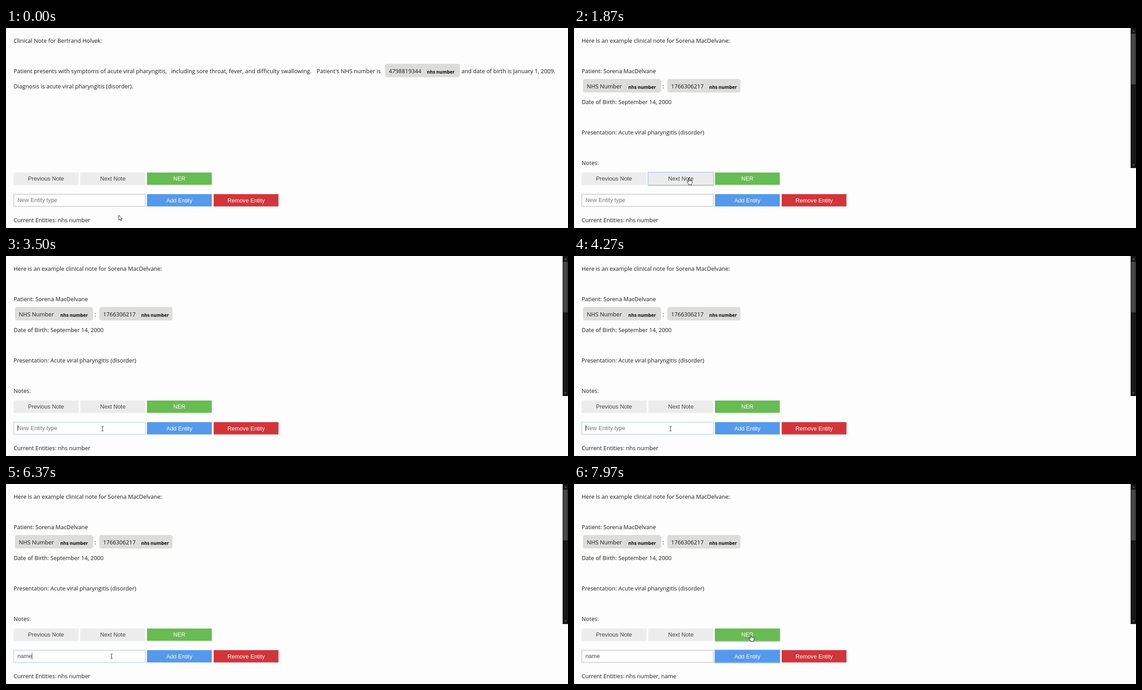
Recreate the animation shown at these times as an HTML page. Size 1253 by 447 pixels, loop 8000 ms.

```html
<!DOCTYPE html>
<html lang="en">
<head>
<meta charset="utf-8">
<title>Clinical note entities</title>
<style>
html, body { margin: 0; width: 100%; height: 100%; overflow: hidden; background: #fcfdfc; }
svg { display: block; width: 1253px; height: 447px; }
text { font: 12.7px "Open Sans", "Noto Sans", sans-serif; fill: #1c1c1c; white-space: pre; }
.tag { font-weight: 700; font-size: 10.2px; fill: #080808; }
.ui { font: 12.8px "Liberation Sans", Arial, sans-serif; fill: #444; }
.mid { text-anchor: middle; }
.light { fill: #fff; }
.hint { fill: #757575; }
</style>
</head>
<body>
<svg id="stage" viewBox="0 0 1253 447">
  <defs>
    <filter id="soft" x="-10%" y="-30%" width="120%" height="170%"><feGaussianBlur stdDeviation="0.9"/></filter>
    <linearGradient id="thumb"><stop stop-color="#383838"/><stop offset=".5" stop-color="#4c4c4c"/><stop offset="1" stop-color="#3a3a3a"/></linearGradient>
  </defs>
  <rect width="1253" height="447" fill="#fcfdfc"/>
</svg>
<script>
const LOOP = 8000, NOTE_AT = 1780, INPUT_AT = 3100, ADD_AT = 7150, LISTED_AT = 7420;
const TYPED_AT = [4750, 4900, 5050, 5200], WORD = "name";
const BLINK = 530;
const stage = document.getElementById("stage");

function el(tag, attrs, parent = stage, content) {
  const node = document.createElementNS("http://www.w3.org/2000/svg", tag);
  for (const key in attrs) node.setAttribute(key, attrs[key]);
  if (content) node.textContent = content;
  return parent.appendChild(node);
}
const group = () => el("g", {});
const write = (parent, x, y, content, cls = "") => el("text", { x, y, class: cls }, parent, content);
const box = (parent, x, y, width, height, attrs) => el("rect", { x, y, width, height, ...attrs }, parent);
const show = (node, on) => node.setAttribute("visibility", on ? "visible" : "hidden");

function pill(parent, x, y, width, value, tagX) {
  box(parent, x, y, width, 30, { rx: 5, fill: "#dcdcdb" });
  write(parent, x + 8.5, y + 20.5, value);
  write(parent, tagX, y + 21.5, "nhs number", "tag");
}

// Notes
const first = group();
write(first, 17, 32.5, "Clinical Note for Bertrand Holvek:");
write(first, 17, 101, "Patient presents with symptoms of acute viral pharyngitis,");
write(first, 368, 101, "including sore throat, fever, and difficulty swallowing.");
write(first, 692.5, 101, "Patient's NHS number is");
pill(first, 845, 80, 167, "4798819344", 938.5);
write(first, 1015.5, 101, "and date of birth is January 1, 2009.");
write(first, 17, 135, "Diagnosis is acute viral pharyngitis (disorder).");

const second = group();
write(second, 17, 32.5, "Here is an example clinical note for Sorena MacDelvane:");
write(second, 17, 101, "Patient: Sorena MacDelvane");
pill(second, 20, 114, 174, "NHS Number", 121);
write(second, 197.5, 135, ":");
pill(second, 208, 114, 163, "1766306217", 301.5);
write(second, 17, 169.5, "Date of Birth: September 14, 2000");
write(second, 17, 238, "Presentation: Acute viral pharyngitis (disorder)");
write(second, 17, 306, "Notes:");
box(second, 1241, 0, 12, 313, { fill: "#171717" });
box(second, 1241.5, 13, 11, 113, { fill: "url(#thumb)" });
el("path", { d: "M1244.5 8.5l3-3.5 3 3.5zM1244.5 304.5l3 3.5 3-3.5z", fill: "#555" }, second);

// Controls
const controls = [];
function button(x, y, label, fill, ring, cls = "light") {
  const shade = box(stage, x, y + 1, 145, 28, { fill: "#777", opacity: .65, filter: "url(#soft)" });
  const focus = box(stage, x - .5, y - .5, 145.5, 29, { fill: "none", stroke: ring, "stroke-width": 1.6 });
  box(stage, x, y, 144.5, 27.5, { fill });
  write(stage, x + 72.3, y + 18.3, label, "ui mid " + cls);
  const item = { x, y, w: 144.5, h: 27.5, shade, focus };
  controls.push(item);
  return item;
}
button(17, 323, "Previous Note", "#ececec", "#a4c4e6", "");
const next = button(165.8, 323, "Next Note", "#ececec", "#a4c4e6", "");
button(314.3, 323, "NER", "#67bc52", "#9ad48b");
const add = button(314.3, 371.3, "Add Entity", "#5499ec", "#8fbcf2");
button(463, 371.3, "Remove Entity", "#d3343a", "#e88b8f");

const field = { x: 17, y: 371, w: 294, h: 28 };
const frame = box(stage, 17.5, 371.5, 293, 27, { fill: "#fff" });
const entry = write(stage, 25.5, 389, "", "ui");
const caret = box(stage, 25.5, 377.5, 1, 14, { fill: "#222" });
const current = write(stage, 17, 434, "");

// Pointers, each with its hot spot at 0,0
const line = { "stroke-width": 1, "stroke-linejoin": "round" };
const arrow = el("path", { d: "M.5 .5V11.5L3 9.2 4.9 13.2 6.7 12.4 4.9 8.6H8.4Z", fill: "#fff", stroke: "#222", ...line });
const beam = el("path", { d: "M-2.5-5H-.7L0-4.4.7-5H2.5M0-4.4V4.4M-2.5 5H-.7L0 4.4.7 5H2.5", fill: "none", stroke: "#222", ...line });
const hand = group();
el("path", {
  d: "M-1 1Q0-.8 1 1V5Q2.2 4 3.2 5.4 4.5 4.5 5.3 6 7-.1 7.4 7.6V10.5Q7.3 12.4 6.2 13.5V15.5H-.2V14L-3.8 9.4Q-4.4 7.6-2.8 7.7L-1 9.3Z"
    .replace("7-.1 7.4 7.6", "7 5.6 7.4 7.6"),
  fill: "#fff", stroke: "#222", ...line
}, hand);
el("path", { d: "M1 5V8M3.2 5.6V8M5.3 6.2V8.2", stroke: "#222", "stroke-width": .8 }, hand);

// Pointer path: time, x, y
const path = [
  [0, 251, 418], [250, 251, 418], [500, 251, 424], [1250, 256, 335], [2050, 256, 335],
  [2600, 231, 385], [2760, 231, 385], [3050, 215, 386], [6200, 215, 386],
  [6950, 368.5, 377.5], [7480, 368.5, 377.5], [7920, 394, 336.5], [LOOP, 394, 336.5]
];
function pointerAt(t) {
  const i = path.findIndex((p, k) => k && t <= p[0]);
  const [a, b] = [path[i - 1], path[i]];
  const u = (t - a[0]) / (b[0] - a[0]);
  const e = u * u * (3 - 2 * u);
  return [a[1] + (b[1] - a[1]) * e, a[2] + (b[2] - a[2]) * e];
}
const inside = (r, x, y) => x >= r.x && x <= r.x + r.w && y >= r.y && y <= r.y + r.h;

function render(t) {
  show(first, t < NOTE_AT);
  show(second, t >= NOTE_AT);

  const [x, y] = pointerAt(t);
  const over = controls.find(c => inside(c, x, y));
  const overField = inside(field, x, y);
  const focused = t >= ADD_AT ? add : t >= INPUT_AT ? field : t >= NOTE_AT - 90 ? next : null;
  for (const c of controls) {
    show(c.shade, c === over);
    show(c.focus, c === focused);
  }

  const count = TYPED_AT.filter(at => t >= at).length;
  entry.textContent = count ? WORD.slice(0, count) : "New Entity type";
  entry.setAttribute("class", count ? "ui" : "ui hint");
  frame.setAttribute("stroke", focused === field ? "#9fc3e8" : "#b0b0b0");
  const since = t - (count ? TYPED_AT[count - 1] : INPUT_AT);
  show(caret, focused === field && Math.floor(since / BLINK) % 2 === 0);
  caret.setAttribute("x", 25.5 + (count ? entry.getComputedTextLength() : 0));
  current.textContent = "Current Entities: nhs number" + (t >= LISTED_AT ? ", name" : "");

  const active = over ? hand : overField ? beam : arrow;
  for (const p of [arrow, beam, hand]) show(p, p === active);
  active.setAttribute("transform", `translate(${x.toFixed(1)} ${y.toFixed(1)})`);
}

function tick() {
  render(performance.now() % LOOP);
  requestAnimationFrame(tick);
}
tick();
</script>
</body>
</html>
```
